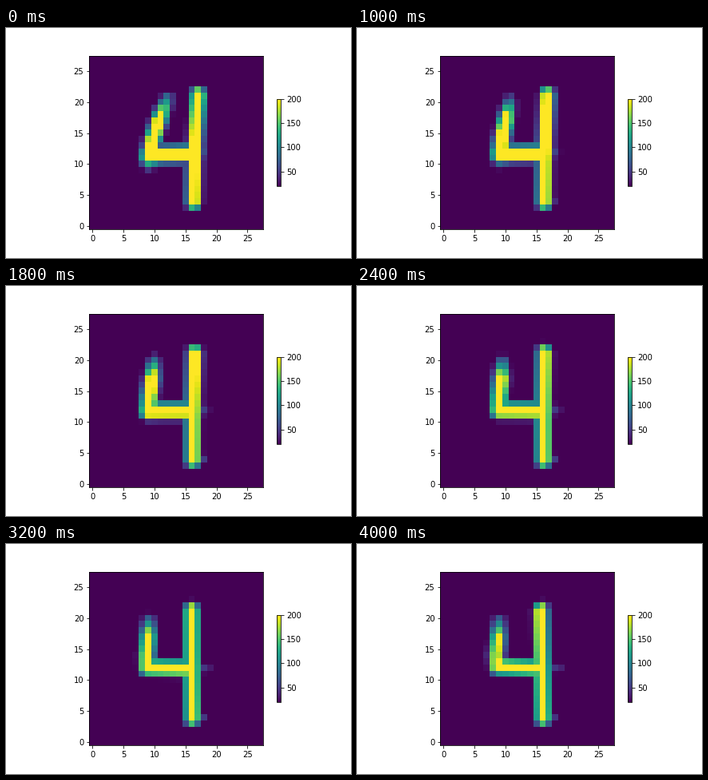
A matplotlib script that plays this animation: 432 by 288 pixels, repeating every 4200 ms.

```python
import numpy as np
import matplotlib.pyplot as plt
from matplotlib.animation import FuncAnimation

FRAMES, INTERVAL, SIZE = 21, 200, 28
COLS, ROWS = np.meshgrid(np.arange(SIZE), np.arange(SIZE))


def mix(a, b, t):
    return a + (b - a) * t


def move(start, end, t):
    return mix(np.array(start, float), np.array(end, float), t)


def stroke(p, q, width, ink_p=270, ink_q=270):
    """Soft line from p to q whose ink changes evenly along its length."""
    dx, dy = q - p
    u = ((COLS - p[0]) * dx + (ROWS - p[1]) * dy) / (dx * dx + dy * dy)
    u = np.clip(u, 0, 1)
    dist2 = (COLS - p[0] - u * dx) ** 2 + (ROWS - p[1] - u * dy) ** 2
    return mix(ink_p, ink_q, u) * np.exp(-dist2 / width ** 2)


def blob(x, y, width, ink):
    return ink * np.exp(-((COLS - x) ** 2 + (ROWS - y) ** 2) / width ** 2)


def digit(frame):
    t = frame / (FRAMES - 1)

    # The hook straightens from its tip downwards.
    tip = move((12.1, 20.5), (9.0, 19.6), 1 - (1 - t) ** 2)
    bend = move((10.75, 17.0), (8.85, 16.8), 1 - (1 - t) ** 1.5)
    knee = move((9.65, 13.5), (8.55, 13.9), t)
    corner = move((9.2, 11.45), (8.85, 12.1), t)
    joint = move((16.3, 11.65), (15.9, 11.9), t)
    top = move((17.05, 21.15), (15.73, 21.25), t)
    waist = move((16.4, 10.5), (15.95, 10.5), t)
    foot = move((16.3, 3.9), (16.03, 3.9), t)

    ink = mix(270, 205, t ** 2)
    strokes = [
        stroke(tip, bend, 1.2, mix(95, 78, t), ink),
        stroke(bend, knee, 1.2, ink, ink),
        stroke(knee, corner, 1.2, ink, 270),
        stroke(corner, joint, mix(1.32, 1.18, t)),
        stroke(top, waist, 1.15),
        stroke(waist, foot, 1.15),
    ]
    shade = np.max(strokes, axis=0)
    shade += blob(9.0, 9.7, 1.2, 55 * max(0, 1 - 2 * t))
    shade += blob(18.5, 11.9, 0.8, mix(22, 55, t))
    shade += blob(18, 4.2, 0.5, 38 * min(1, 2 * t))
    return np.clip(shade, 0, 255)


plt.rcParams.update({
    "font.family": "DejaVu Sans",
    "font.size": 10,
    "figure.subplot.bottom": 0.125,
})
fig, ax = plt.subplots(figsize=(6, 4), dpi=72)
image = ax.imshow(digit(0), origin="lower", cmap="viridis", vmin=20, vmax=200)
ax.set_xticks(range(0, 26, 5))
ax.set_yticks(range(0, 26, 5))
fig.colorbar(image, shrink=0.5, ticks=[50, 100, 150, 200])


def update(frame):
    image.set_data(digit(frame))
    return [image]


animation = FuncAnimation(fig, update, frames=FRAMES, interval=INTERVAL,
                          repeat=True, repeat_delay=0)
plt.show()
```
